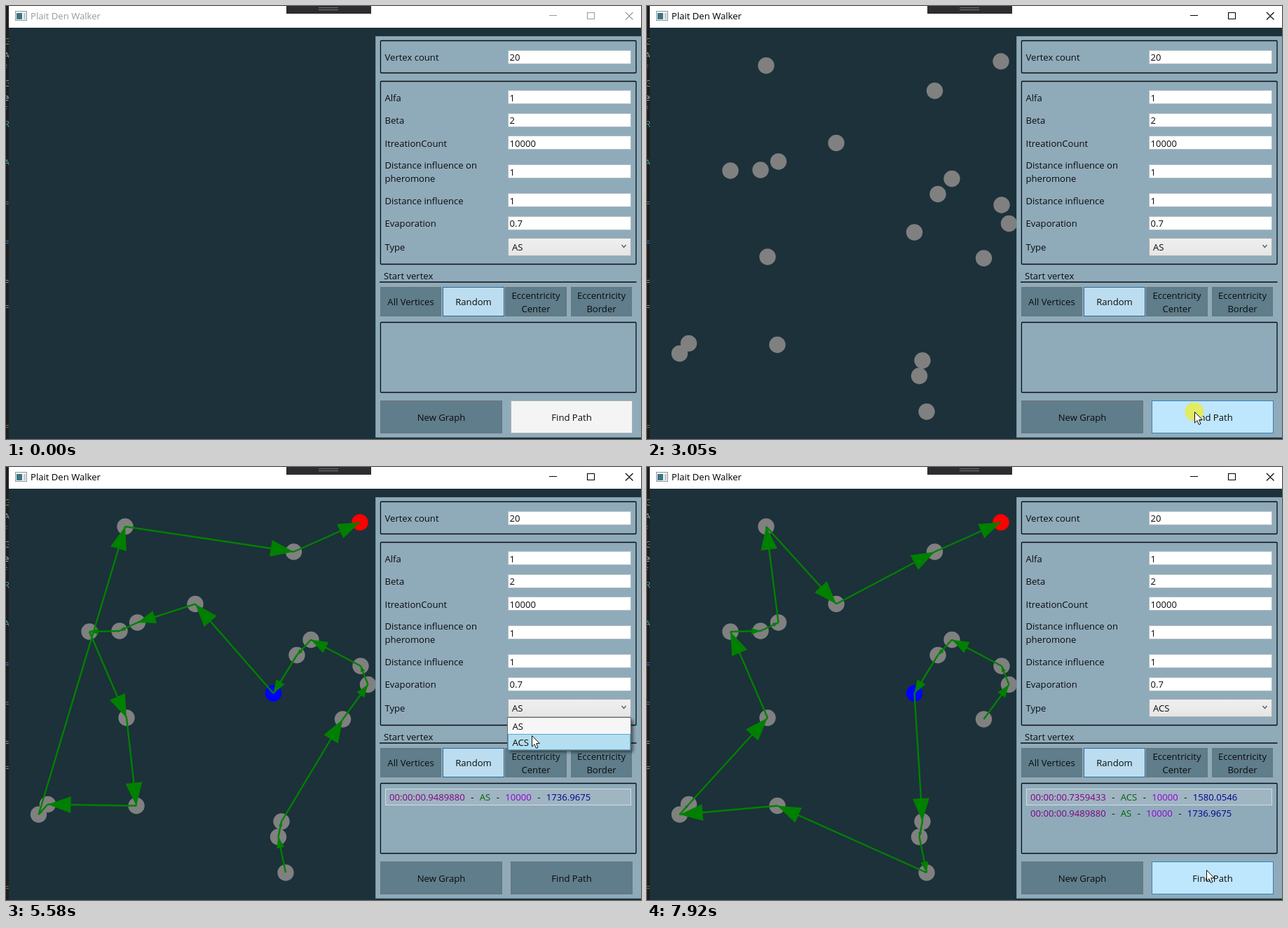
Recreate the animation shown at these times as an HTML page. Size 906 by 618 pixels, loop 7990 ms.

```html
<!DOCTYPE html>
<html lang="en">
<head>
<meta charset="utf-8">
<title>Plait Den Walker</title>
<style>
html, body { margin: 0; width: 100%; height: 100%; overflow: hidden; background: #1c3139; }
svg { display: block; }
text { font: 13.1px "Open Sans", "Noto Sans", sans-serif; white-space: pre; }
</style>
</head>
<body>
<svg id="stage" width="906" height="618" viewBox="0 0 906 618">
  <defs>
    <linearGradient id="plain" x2="0" y2="1"><stop stop-color="#f0f0f0"/><stop offset="1" stop-color="#e5e5e5"/></linearGradient>
    <linearGradient id="lit" x2="0" y2="1"><stop stop-color="#ecf4fc"/><stop offset="1" stop-color="#dcecfc"/></linearGradient>
    <filter id="blur"><feGaussianBlur stdDeviation="2"/></filter>
    <clipPath id="edge"><path d="M0 0H4V618H0Z"/></clipPath>
  </defs>
</svg>
<script>
const LOOP = 7990;
const stage = document.getElementById('stage');

function add(tag, attrs, parent = stage) {
  const el = document.createElementNS('http://www.w3.org/2000/svg', tag);
  for (const k in attrs) el.setAttribute(k, attrs[k]);
  return parent.appendChild(el);
}
// Rectangle whose 1px border lies inside x..x2, y..y2
const box = (x, y, x2, y2, fill, stroke = 'none', parent = stage) =>
  add('rect', { x: x + .5, y: y + .5, width: x2 - x - 1, height: y2 - y - 1, fill, stroke }, parent);
const fillBox = (x, y, x2, y2, fill, parent) =>
  add('path', { d: `M${x} ${y}H${x2}V${y2}H${x}Z`, fill }, parent);
const line = (d, stroke, width = 1, parent = stage) =>
  add('path', { d, fill: 'none', stroke, 'stroke-width': width }, parent);
function label(x, y, str, parent = stage, fill = '#0b0b0b', anchor = 'start') {
  const el = add('text', { x, y, fill, 'text-anchor': anchor }, parent);
  el.textContent = str;
  return el;
}
const paint = (el, fill, stroke) => { el.setAttribute('fill', fill); el.setAttribute('stroke', stroke); };
const show = (el, on) => el.setAttribute('visibility', on ? 'visible' : 'hidden');

// Editor showing behind the window's left edge
fillBox(0, 0, 4, 618, '#1e1e1e');
const code = add('g', { 'clip-path': 'url(#edge)' });
[[55, 'G', '#6f9a78'], [75, 'A', '#8fa89a'], [94, 'f', '#4b8fd0'], [115, 'G', '#8a9a90'], [135, 'e', '#c8c8c8'],
 [153, 'f', '#4b8fd0'], [173, 'R', '#5a8fa8'], [228, 'A', '#4ba89a'], [286, '=', '#4b8fd0'], [342, '=', '#4b8fd0'],
 [398, '=', '#a8a8a8'], [434, '=', '#8aa89a'], [488, 'I', '#e0e0e0'], [605, '=', '#a07840']]
  .forEach(([y, ch, fill]) => label(-3, y, ch, code, fill));

// Title bar
fillBox(4, 0, 906, 31, '#fff');
box(13, 7, 30, 21, '#f4f6f7', '#8b959b');
fillBox(15, 10, 23, 19, '#3c7480');
fillBox(25, 10, 28, 19, '#c3ccd0');
const title = label(35, 19, 'Plait Den Walker');
const caption = line('M775 13.5H786M829.5 9.5H839.5V18.5H829.5ZM884 9L894.5 19.5M894.5 9L884 19.5', '#000', 1.1);
fillBox(400, 0, 521, 11, '#2d2d30');
line('M446 2.5H474M446 5.5H474', '#77777a');

// Graph
const nodes = [[399, 579], [388.5, 528], [393, 506], [480.5, 360], [516.5, 310.5], [506, 284], [435, 246.5],
  [415, 268.5], [381.5, 323], [270, 195.5], [187.5, 222], [162, 234], [119, 235], [172, 358], [186, 483.5],
  [59.5, 481.5], [46.5, 496], [170, 85], [410.5, 121], [505, 79]];
const graph = add('g', {});
const dots = nodes.map(([cx, cy]) => add('circle', { cx, cy, r: 11.7, fill: '#808080' }, graph));

function arrow(parent, [x, y], [x2, y2]) {
  const len = Math.hypot(x2 - x, y2 - y), ux = (x2 - x) / len, uy = (y2 - y) / len;
  const head = Math.min(33, len * .3), half = head * .36;
  const bx = x2 - ux * head, by = y2 - uy * head;
  line(`M${x} ${y}L${x2} ${y2}`, '#008000', 2.4, parent);
  add('path', { d: `M${x2} ${y2}L${bx - uy * half} ${by + ux * half}L${bx + uy * half} ${by - ux * half}Z`, fill: '#008000' }, parent);
}
function route(order) {
  const g = add('g', {});
  order.slice(1).forEach((n, i) => arrow(g, nodes[order[i]], nodes[n]));
  return g;
}
const routeA = route(nodes.map((_, i) => i));
const routeB = route([3, 4, 5, 6, 7, 8, 2, 1, 0, 14, 16, 15, 13, 12, 11, 10, 17, 9, 18, 19]);

// Side panel
box(527, 43, 907, 616, '#8fabba', '#7895a4');
[[49, 96], [107, 369], [451, 552]].forEach(([a, b]) =>
  add('rect', { x: 534.4, y: a + .5, width: 364.6, height: b - a - 1, rx: 1, fill: 'none', stroke: '#0a0e10', 'stroke-width': 1.3 }));
[['Vertex count', 73, '20'], ['Alfa', 130.5, '1'], ['Beta', 163, '2'], ['ItreationCount', 195.5, '10000'],
 ['', 236.5, '1'], ['Distance influence', 277.5, '1'], ['Evaporation', 310, '0.7']].forEach(([name, y, value]) => {
  box(716, Math.round(y - 10.5), 892, Math.round(y + 9.5), '#fff', '#b4bdc4');
  label(540.5, y + 5, name);
  label(718.5, y + 5, value);
});
label(540.5, 232, 'Distance influence on');
label(540.5, 250.5, 'pheromone');
label(540.5, 349, 'Type');
label(539, 390, 'Start vertex');
line('M533 394H899.5', '#0a0e10', 1.3);

const combo = box(716, 331, 892, 357, 'url(#plain)', '#acacac');
const kind = label(722, 349, 'AS');
line('M878.5 341L881.5 344.5L884.5 341', '#555', 1.2);

function button(x, y, x2, y2, ...rows) {
  const el = box(x, y, x2, y2);
  rows.forEach((s, i) => label((x + x2) / 2, (y + y2) / 2 + 5.3 + (i - (rows.length - 1) / 2) * 18.5, s, stage, '#0b0b0b', 'middle'));
  return { el, x, y, x2, y2 };
}
const toggles = [
  button(534, 401, 621, 443, 'All Vertices'),
  button(623, 401, 711, 443, 'Random'),
  button(712, 401, 800, 443, 'Eccentricity', 'Center'),
  button(806, 401, 893, 443, 'Eccentricity', 'Border')];
const newGraph = button(534, 563, 708, 610, 'New Graph');
const findPath = button(720, 563, 894, 610, 'Find Path');

// Result list
const selected = box(541, 459, 892, 483, '#9fb5c2', '#d3dbe0');
function result(time, type, length) {
  const el = label(547, 476, '');
  [[time, '#800080'], ['-'], [type, '#006400'], ['-'], ['10000', '#9400d3'], ['-'], [length, '#00008b']]
    .forEach(([s, fill = '#0b0b0b'], i) => { add('tspan', { fill, dx: i ? 8.4 : 0 }, el).textContent = s; });
  return el;
}
const resultA = result('00:00:00.9489880', 'AS', '1736.9675');
const resultB = result('00:00:00.7359433', 'ACS', '1580.0546');

// Drop-down
const popup = add('g', {});
add('rect', { x: 719, y: 361, width: 176, height: 46, fill: '#000', opacity: .5, filter: 'url(#blur)' }, popup);
box(715, 357, 892, 405, '#f6f6f6', '#6b6b6b', popup);
const items = [358, 381].map(y => box(716, y, 891, y + 23, 'none', 'none', popup));
label(722.5, 375, 'AS', popup);
label(722.5, 398, 'ACS', popup);

// Pointer
const pointer = add('g', {});
const glow = add('circle', { r: 13.5, fill: '#e4ec56', opacity: .92 }, pointer);
add('path', { d: 'M.5 .5V16L4 12.6L6.4 18.4L9 17.3L6.6 11.6H11.3Z', fill: '#fff', stroke: '#111' }, pointer);

// Pointer moves: first step, last step, number of steps, end point
const moves = [
  [210, 690, 7, 668, 583], [1300, 1540, 4, 717, 537], [1710, 1950, 4, 735, 519], [2030, 2500, 7, 781, 579],
  [3730, 4510, 11, 768, 374], [4590, 4815, 4, 757, 348], [5290, 5580, 5, 750, 383], [5660, 5740, 2, 750, 387],
  [6370, 6370, 1, 749, 399], [6450, 6920, 7, 797, 576], [7920, 7920, 1, 798, 575]];
const clicks = [[840, 920], [3050, 3200], [4890, 5040], [5820, 5990], [7380, 7530]];

function pointerAt(t) {
  let x = 745, y = 622;
  for (const [from, to, n, ex, ey] of moves) {
    if (t < from) break;
    const step = to > from ? Math.floor((t - from) / (to - from) * (n - 1) + .001) + 1 : 1;
    const k = 1 - (1 - Math.min(1, step / n)) ** 2;
    x += (ex - x) * k;
    y += (ey - y) * k;
  }
  return [x, y];
}

function draw(t) {
  const [x, y] = pointerAt(t);
  const moving = t >= 210, active = t >= 840, made = t >= 920, first = t >= 3200, second = t >= 7530;
  const open = t >= 4965 && t < 5900;
  const over = b => moving && x >= b.x && x < b.x2 && y >= b.y && y < b.y2;
  const skin = (b, hot) => hot ? paint(b.el, '#bee6fd', '#3c7fb1') : paint(b.el, '#5f7d8b', '#6d7478');

  title.setAttribute('fill', active ? '#000' : '#999');
  caption.setAttribute('stroke', active ? '#000' : '#999');
  show(graph, made);
  dots[8].setAttribute('fill', first ? '#00f' : '#808080');
  dots[19].setAttribute('fill', first ? '#f00' : '#808080');
  show(routeA, first && !second);
  show(routeB, second);

  toggles.forEach(b => skin(b, !open && over(b)));
  paint(toggles[1].el, '#bbddef', '#2f6797');
  skin(newGraph, over(newGraph));
  if (made) skin(findPath, over(findPath));
  else paint(findPath.el, '#f4f4f4', '#adb2b5');

  const hot = over({ x: 716, y: 331, x2: 892, y2: 357 });
  paint(combo, hot ? 'url(#lit)' : 'url(#plain)', hot ? '#7eb4ea' : '#acacac');
  kind.textContent = t >= 5900 ? 'ACS' : 'AS';
  show(popup, open);
  const pick = y >= 381 ? 1 : 0;
  items.forEach((el, i) => i === pick ? paint(el, '#b5dff0', '#4fa9d3') : paint(el, 'none', 'none'));

  show(selected, first);
  show(resultA, first);
  show(resultB, second);
  resultA.setAttribute('y', second ? 499 : 476);

  show(pointer, moving);
  pointer.setAttribute('transform', `translate(${Math.round(x)} ${Math.round(y)})`);
  glow.setAttribute('opacity', clicks.some(([a, b]) => t >= a && t < b) ? .92 : 0);
}

const start = performance.now();
function tick() {
  draw((performance.now() - start) % LOOP);
  requestAnimationFrame(tick);
}
tick();
</script>
</body>
</html>
```
